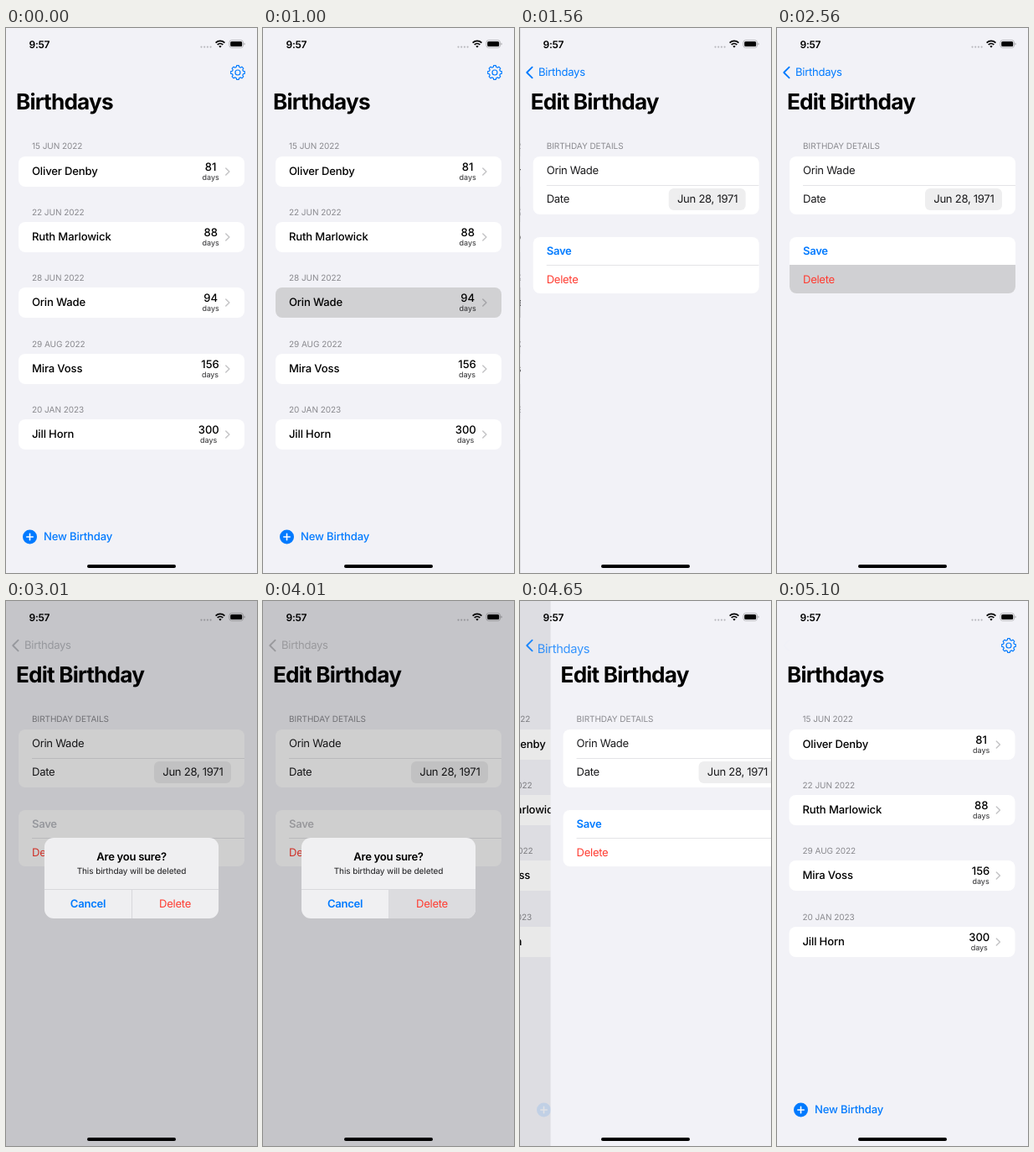
An HTML page for the animation above (6.1 s loop, 300 px wide and 649 px high).

```html
<!DOCTYPE html>
<html lang="en">
<head>
<meta charset="utf-8">
<title>Birthdays</title>
<style>
  html, body { margin: 0; width: 100%; height: 100%; overflow: hidden; background: #f2f2f7; }
  #stage {
    position: relative; width: 300px; height: 649px; overflow: hidden; background: #f2f2f7;
    font: 400 13.08px/20px Inter, "Liberation Sans", sans-serif;
    font-optical-sizing: none; text-rendering: geometricPrecision;
    letter-spacing: -.022em; color: #000; white-space: nowrap;
  }
  #stage div, #stage svg { position: absolute; }
  .page, .fill { left: 0; top: 0; width: 300px; height: 649px; }
  .page { background: #f2f2f7; }
  #shade, #dim { background: #000; opacity: 0; }

  .title {
    left: 12px; top: 74px; font-size: 26.15px; line-height: 30px;
    font-weight: 700; letter-spacing: -.031em;
  }
  .head { left: 31px; font-size: 10px; color: #8a8a8f; letter-spacing: -.005em; }
  .card { left: 15.4px; width: 269.4px; background: #fff; border-radius: 8px; overflow: hidden; }
  .medium { font-weight: 500; letter-spacing: -.012em; }
  .line { background: #e4e4e7; }
  .blue { color: #007aff; }
  .red { color: #ff3b30; }
  #edit .card { color: #1a1a1c; }

  #stage .section { position: relative; height: 78.4px; }
  #rows { left: 0; top: 131.4px; width: 300px; }
  .section .head { top: 0; }
  .section .card { top: 21.2px; height: 36px; }
  .section .name { left: 15.6px; top: 8px; }
  .section .count {
    right: 30px; top: 3px; display: flex; flex-direction: column; align-items: center;
    letter-spacing: 0;
  }
  .count b { font-weight: 500; }
  .count span { font-size: 9px; line-height: 10px; margin-top: -2px; color: #2c2c2e; }
  .section svg { left: 246px; top: 12px; }

  #back { left: 22px; top: 43px; }
  #back, #oldTitle { transform-origin: 0 50%; }

  #alert {
    left: 46px; top: 282px; width: 208px; height: 95.5px; border-radius: 11px;
    background: #f0f0f2; overflow: hidden; text-align: center; opacity: 0;
  }
  #alert .wide { left: 0; width: 208px; }
  #alert .line { background: #d9d9dd; }
  #alert .half { top: 62px; width: 104px; height: 34px; line-height: 34px; }
</style>
</head>
<body>
<div id="stage">
  <div class="page" id="list">
    <div id="rows"></div>
    <div class="fill" id="shade"></div>
  </div>

  <div class="fill" id="tools">
    <svg class="fill" viewBox="0 0 300 649" fill="none">
      <g stroke="#007aff" stroke-width="1.2" stroke-linejoin="round">
        <path id="gear"/>
        <circle cx="277" cy="53" r="3"/>
      </g>
      <circle cx="28.5" cy="606" r="8.5" fill="#007aff"/>
      <path d="M24.8 606h7.4M28.5 602.3v7.4" stroke="#fff" stroke-width="1.6" stroke-linecap="round"/>
    </svg>
    <div class="medium blue" style="left:45px;top:596px">New Birthday</div>
  </div>

  <div class="page" id="edit">
    <div class="head" style="top:131.4px">BIRTHDAY DETAILS</div>
    <div class="card" style="top:152.5px;height:69px">
      <div style="left:15.6px;top:7.5px">Orin Wade</div>
      <div class="line" style="left:15.6px;right:0;top:34px;height:.8px"></div>
      <div style="left:15.6px;top:41.8px">Date</div>
      <div style="left:162px;top:38.5px;width:92px;height:26px;border-radius:6px;background:#eeeeef;line-height:26px;text-align:center">Jun 28, 1971</div>
    </div>
    <div class="card" style="top:248.5px;height:67.6px">
      <div class="tint" style="left:15.6px;top:7.2px;font-weight:600">Save</div>
      <div class="line" style="left:15.6px;right:0;top:33.4px;height:.8px"></div>
      <div id="pressDelete" style="left:0;right:0;top:33.4px;bottom:0;background:#d0d0d3"></div>
      <div class="red" style="left:15.6px;top:41px">Delete</div>
    </div>
  </div>

  <div class="title" id="oldTitle">Birthdays</div>
  <div class="title" id="newTitle">Edit Birthday</div>
  <div class="tint" id="back">Birthdays</div>
  <svg class="tint" id="arrow" style="left:0;top:40px" width="22" height="26" fill="none">
    <path d="M14.6 6.6 8.2 13l6.4 6.4" stroke="currentColor" stroke-width="1.8" stroke-linecap="round" stroke-linejoin="round"/>
  </svg>

  <div style="left:27.5px;top:9.5px;font-size:12px;font-weight:600">9:57</div>
  <svg class="fill" viewBox="0 0 300 649" fill="none">
    <path d="M233.5 22.6h12" stroke="#b9b9be" stroke-width="2.2" stroke-linecap="round" stroke-dasharray="0 3.7"/>
    <g stroke="#000" stroke-width="1.7">
      <path d="M250.6 17.6a7.7 7.7 0 0 1 10.8 0M252.7 19.9a4.7 4.7 0 0 1 6.6 0"/>
      <path d="M256 23.6l-1.7-1.8a2.5 2.5 0 0 1 3.4 0z" fill="#000" stroke="none"/>
    </g>
    <rect x="266.9" y="14.6" width="16.6" height="8.8" rx="2.7" stroke="#a6a6aa" stroke-width=".8"/>
    <rect x="268.2" y="15.9" width="14" height="6.2" rx="1.5" fill="#000"/>
    <path d="M284.5 17.4q1.2.4 1.2 1.6t-1.2 1.6z" fill="#a6a6aa"/>
  </svg>

  <div class="fill" id="dim"></div>
  <div id="alert">
    <div class="wide" style="top:13px;font-weight:600">Are you sure?</div>
    <div class="wide" style="top:29.5px;font-size:10px;letter-spacing:-.008em;color:#1a1a1c">This birthday will be deleted</div>
    <div id="pressAlert" style="left:104px;top:62px;width:104px;height:34px;background:#dcdcdf"></div>
    <div class="line wide" style="top:61.2px;height:.8px"></div>
    <div class="line" style="left:103.6px;top:62px;width:.8px;height:34px"></div>
    <div class="half blue" style="left:0;font-weight:600">Cancel</div>
    <div class="half red" style="left:104px">Delete</div>
  </div>
  <div style="left:97px;top:639px;width:106px;height:3.8px;border-radius:2px;background:#000"></div>
</div>

<script>
const LOOP = 6100;
const $ = id => document.getElementById(id);

const people = [
  ["15 JUN 2022", "Oliver Denby", 81],
  ["22 JUN 2022", "Ruth Marlowick", 88],
  ["28 JUN 2022", "Orin Wade", 94],
  ["29 AUG 2022", "Mira Voss", 156],
  ["20 JAN 2023", "Jill Horn", 300]
];
$("rows").innerHTML = people.map(([date, name, days]) => `
  <div class="section">
    <div class="head">${date}</div>
    <div class="card">
      <div class="name medium">${name}</div>
      <div class="count"><b>${days}</b><span>days</span></div>
      <svg width="8" height="12" fill="none"><path d="M1.8 2 5.9 6 1.8 10" stroke="#3c3c434d"
        stroke-width="1.5" stroke-linecap="round" stroke-linejoin="round"/></svg>
    </div>
  </div>`).join("");
const chosen = $("rows").children[2];
const chosenCard = chosen.querySelector(".card");
const tinted = document.querySelectorAll(".tint");

function gearPath() {
  const pts = [];
  for (let i = 0; i < 8; i++) {
    for (const [turn, r] of [[-.27, 6.7], [-.16, 8.4], [.16, 8.4], [.27, 6.7]]) {
      const a = i * Math.PI / 4 + turn;
      pts.push((277 + r * Math.cos(a)).toFixed(2) + " " + (53 + r * Math.sin(a)).toFixed(2));
    }
  }
  return "M" + pts.join("L") + "Z";
}
$("gear").setAttribute("d", gearPath());

// The picture is held between stops: [from, to, intervals]
const stops = [0];
for (const [from, to, n] of [[1000, 1560, 7], [2560, 3010, 6], [4010, 4190, 2], [4190, 4570, 5], [4650, 5100, 6]]) {
  for (let i = 0; i <= n; i++) stops.push(from + (to - from) * i / n);
}
const hold = t => stops.reduce((last, s) => s <= t ? s : last, 0);

// Critically damped spring from 0 to 1
function spring(ms, speed) {
  const u = Math.max(0, ms) / 1000 * speed;
  return 1 - (1 + u) * Math.exp(-u);
}
const mix = (a, b, k) => a + (b - a) * k;
const move = (x, y, s) => `translate(${x}px, ${y}px) scale(${s})`;

function draw(t) {
  const open = spring(t - 1040, 16) - spring(t - 4610, 15);
  const asked = spring(t - 2600, 18) - spring(t - 4080, 18);
  const away = 1 - open;

  chosen.style.display = t >= 4500 ? "none" : "";
  chosenCard.style.background = t >= 1000 ? "#d1d1d3" : "#fff";
  $("list").style.transform = move(-90 * open, 0, 1);
  $("shade").style.opacity = .1 * open;
  $("tools").style.opacity = away;

  $("edit").style.transform = $("newTitle").style.transform = move(300 * away, 0, 1);
  $("oldTitle").style.transform = move(10 * open, -35 * open, 1 - open / 2);
  $("oldTitle").style.opacity = Math.max(0, 1 - 1.6 * open);
  $("back").style.transform = move(-10 * away, 35 * away, 1 + away);
  $("back").style.opacity = open * open;
  $("arrow").style.opacity = open;

  const grey = asked ** 3;
  const tint = `rgb(${mix(0, 188, grey)}, ${mix(122, 188, grey)}, ${mix(255, 192, grey)})`;
  tinted.forEach(el => el.style.color = tint);

  $("pressDelete").style.opacity = t >= 2560 && t < 4000 ? 1 - asked : 0;
  $("dim").style.opacity = .19 * asked;
  $("alert").style.opacity = asked;
  $("alert").style.transform = move(0, 0, t < 4000 ? 1 + .15 * (1 - asked) : 1);
  $("pressAlert").style.opacity = t >= 4010 && t < 4100 ? 1 : 0;
}

function tick() {
  draw(hold(performance.now() % LOOP));
  requestAnimationFrame(tick);
}
tick();
</script>
</body>
</html>
```
